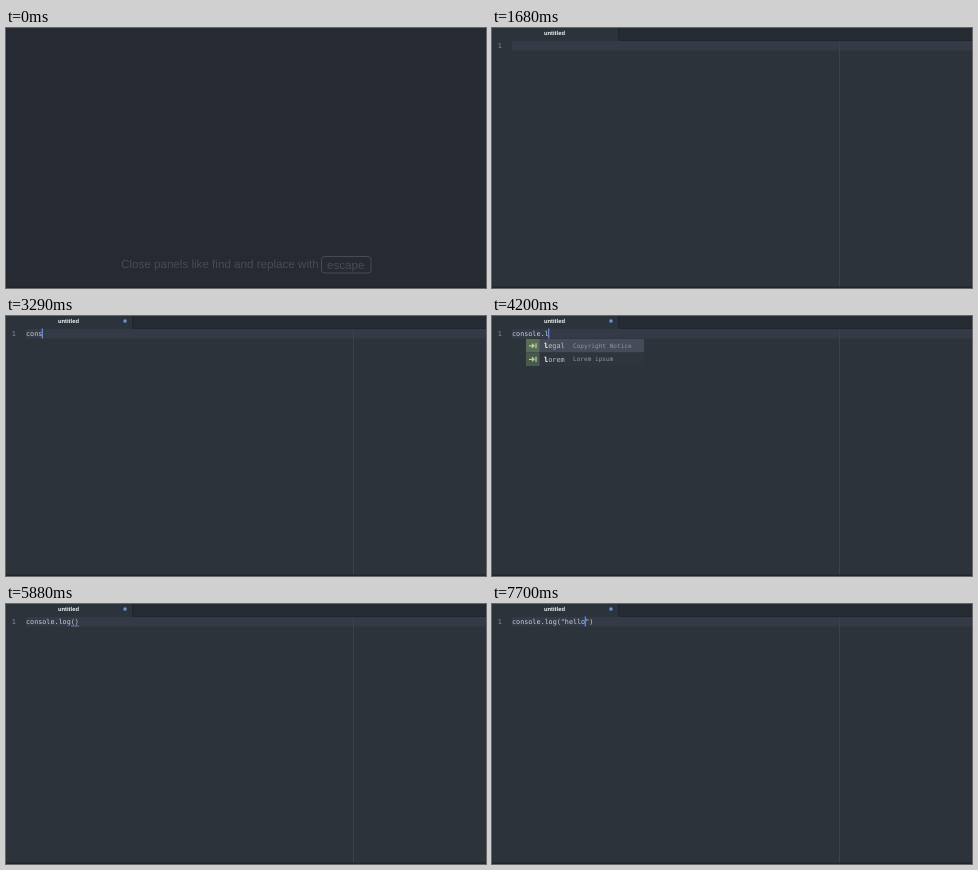
An HTML page that plays this animation: 480x260 px, repeating every 8 s.

```html
<!DOCTYPE html>
<html lang="en">
<head>
<meta charset="utf-8">
<title>Editor typing</title>
<style>
  html, body { margin: 0; width: 100%; height: 100%; overflow: hidden; background: #262a32; }
  svg { display: block; width: 480px; height: 260px; }
  text { white-space: pre; text-rendering: geometricPrecision; }
  .ui { font-family: "Liberation Sans", Arial, sans-serif; }
  .mono { font-family: "DejaVu Sans Mono", monospace; font-size: 6.76px; }
  .tip { font-size: 11.64px; fill: #52565e; }
  .word { font-size: 6.9px; fill: #bcc2cc; }
  .word tspan { font-weight: bold; fill: #fff; }
  .note { font-size: 6.1px; fill: #9096a2; }
  .icon { fill: none; stroke: #b5cf98; stroke-width: 1.3; }
</style>
</head>
<body>
<svg viewBox="0 0 480 260">
  <rect width="480" height="260" fill="#262a32"/>

  <g id="tip" class="ui tip">
    <text x="115" y="240">Close panels like find and replace with</text>
    <rect x="315.5" y="228.5" width="49.5" height="16.5" rx="3" fill="none" stroke="#52565e"/>
    <text x="321" y="241">escape</text>
  </g>

  <g id="editor">
    <rect y="12" width="480" height="248" fill="#2d333b"/>
    <rect width="127" height="13" fill="#2d333b"/>
    <rect x="126" width="1" height="12" fill="#21252b"/>
    <rect x="127" y="12" width="353" height="1" fill="#20242b"/>
    <rect x="20" y="13" width="460" height="9.5" fill="#343a46"/>
    <rect x="347" y="13" width="1" height="246" fill="#3c424a"/>
    <text class="ui" x="52" y="7" font-size="5.8" font-weight="bold" fill="#f4f5f7">untitled</text>
    <circle id="dot" cx="119" cy="5" r="1.7" fill="#6c94ec"/>
    <text class="mono" x="5.8" y="19.6" fill="#868d99">1</text>
    <text id="code" class="mono" x="20" y="19.6" fill="#ccd1da"></text>
    <path id="match" d="M65 22h8" stroke="#7189c4" stroke-width="0.9"/>
    <rect id="cursor" y="12.5" width="1.3" height="10" fill="#5a8af0"/>
    <g id="popup"></g>
  </g>
  <rect y="258.5" width="480" height="1.5" fill="#24242d"/>
</svg>
<script>
  const LOOP = 8000, CHAR = 4.07, LEFT = 19.4;
  const $ = id => document.getElementById(id);
  const show = (id, on) => $(id).setAttribute("visibility", on ? "inherit" : "hidden");

  // Each step holds from its time until the next one.
  const at = (steps, t) => steps.reduce((v, [start, value]) => t >= start ? value : v, steps[0][1]);

  const typed = [
    [0, ""], [2380, "c"], [2520, "co"], [3080, "con"], [3290, "cons"],
    [3360, "conso"], [3500, "consol"], [3710, "console"], [3920, "console."],
    [4200, "console.l"], [4410, "console.lo"], [4830, "console.log"],
    [5600, "console.log(|)"], [6650, 'console.log("|")'],
    [7000, 'console.log("h|")'], [7210, 'console.log("he|")'],
    [7350, 'console.log("hel|")'], [7490, 'console.log("hell|")'],
    [7700, 'console.log("hello|")']
  ];
  const blink = [
    [0, 1], [840, 0], [1260, 1], [1680, 0], [2100, 1], [2940, 0], [3080, 1],
    [5320, 0], [5600, 1], [5880, 0], [6300, 1]
  ];
  const tipFade = [[0, 0.76], [70, 0.88], [140, 1]];
  const menus = [[0, ""], [4200, "l"], [4480, "lo"], [4900, ""]];
  const snippets = [["legal", "Copyright Notice"], ["lorem", "Lorem ipsum"]];

  function row([word, note], i, prefix, width) {
    const y = 23 + i * 13.5;
    return `<rect x="34" y="${y}" width="${width}" height="13.5" fill="${i ? "#2f343d" : "#454b57"}"/>
      <rect x="34" y="${y}" width="13.5" height="13.5" fill="${i ? "#485a4c" : "#586c58"}"/>
      <path class="icon" d="M37 ${y + 6.8}h5m-2 -2l2 2l-2 2M44 ${y + 4.3}v5"/>
      <text class="mono word" x="52" y="${y + 9.2}"><tspan>${prefix}</tspan>${word.slice(prefix.length)}</text>
      <text class="mono note" x="81" y="${y + 8.8}">${note}</text>`;
  }

  function menu(prefix) {
    if (!prefix) return "";
    const found = snippets.filter(([word]) => word.startsWith(prefix));
    const width = 59 + Math.max(...found.map(s => s[1].length)) * 3.69;
    return found.map((s, i) => row(s, i, prefix, width)).join("");
  }

  let lastMenu = "";
  function draw(t) {
    const line = at(typed, t), caret = line.indexOf("|");
    const column = caret < 0 ? line.length : caret;
    show("tip", t < 420);
    $("tip").setAttribute("opacity", at(tipFade, t));
    show("editor", t >= 420);
    show("dot", t >= 2800);
    show("match", t >= 5600 && t < 6650);
    show("cursor", at(blink, t));
    $("cursor").setAttribute("x", LEFT + column * CHAR);
    $("code").textContent = line.replace("|", "");
    const prefix = at(menus, t);
    if (prefix !== lastMenu) $("popup").innerHTML = menu(prefix);
    lastMenu = prefix;
  }

  const begin = performance.now();
  function tick() {
    draw((performance.now() - begin) % LOOP);
    requestAnimationFrame(tick);
  }
  tick();
</script>
</body>
</html>
```
